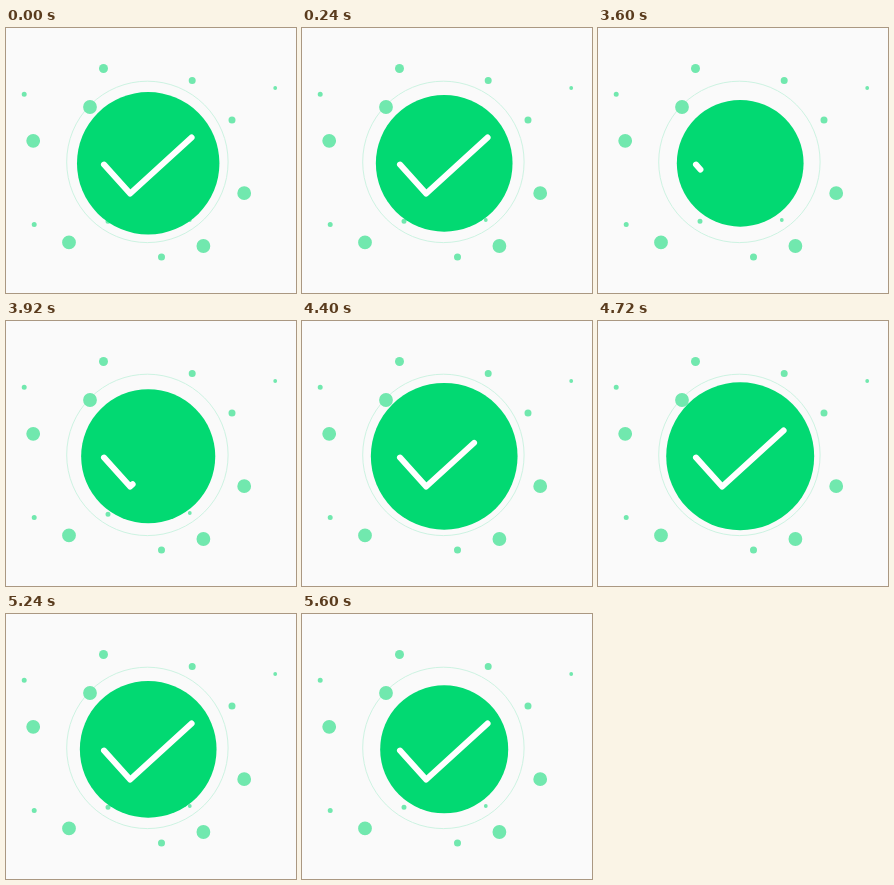
An HTML page for the animation above (7600 ms loop, 290 by 265 pixels).

```html
<!DOCTYPE html>
<html lang="en">
<head>
<meta charset="utf-8">
<title>Success check</title>
<style>
  html, body { margin: 0; width: 100%; height: 100%; overflow: hidden; background: #fafafa; }
  svg { display: block; }
  path { fill: none; stroke-linecap: round; stroke-linejoin: round; }
</style>
</head>
<body>
<svg width="290" height="265" viewBox="0 0 290 265">
  <rect width="290" height="265" fill="#fafafa"/>
  <circle cx="141.4" cy="133.9" r="80.7" fill="none" stroke="#cdf3e2"/>
  <!-- Round caps on empty segments make the dots, one path per size -->
  <g stroke="#71e8ae">
    <path stroke-width="13.8" d="M84 79h0M27.2 112.8h0M238.2 165.2h0M63 214.4h0M197.4 218h0"/>
    <path stroke-width="9" d="M97.5 40.5h0"/>
    <path stroke-width="7" d="M186.2 52.5h0M226 92h0M155.5 229h0"/>
    <path stroke-width="5" d="M18.2 66.2h0M102 193.2h0M28.2 196.5h0"/>
    <path stroke-width="3.8" d="M269.2 60h0M183.8 192h0"/>
  </g>
  <circle id="disc" cx="142.2" cy="135.3" fill="#02d972"/>
  <path id="check" d="M98 136.6L124.1 165.6L185.6 109.5" stroke="#fff" stroke-width="6"/>
</svg>
<script>
  const LOOP = 7600, PULSE = 2000, PULSE_START = 3600, HEAD_START = 1400, STEP = 40;
  const REST_RADIUS = 62.7, GROWTH = 0.2;
  const disc = document.getElementById('disc');
  const check = document.getElementById('check');
  const length = check.getTotalLength();

  // Pulse time to phase: 0-1 grows and draws the check, 1-2 shrinks
  const keys = [[0, 0.054], [320, 0.347], [800, 0.85], [1400, 1.32], [PULSE, 1.895]];

  function phaseAt(t) {
    const i = Math.max(1, keys.findIndex(([end]) => t <= end));
    const [t0, p0] = keys[i - 1], [t1, p1] = keys[i];
    return p0 + (p1 - p0) * (t - t0) / (t1 - t0);
  }

  function draw(time) {
    const t = Math.floor((time % LOOP) / STEP) * STEP;
    // The loop opens on the tail of a pulse, rests, then plays a whole one
    const elapsed = t < PULSE_START ? t + HEAD_START : t - PULSE_START;
    const phase = phaseAt(Math.min(elapsed, PULSE));
    const swell = 1 - Math.abs(1 - phase);
    disc.setAttribute('r', REST_RADIUS * (1 + GROWTH * swell));
    check.setAttribute('stroke-dasharray', `${length * Math.min(phase, 1)} ${length * 2}`);
  }

  const start = performance.now();
  function tick() {
    draw(performance.now() - start);
    requestAnimationFrame(tick);
  }
  tick();
</script>
</body>
</html>
```
